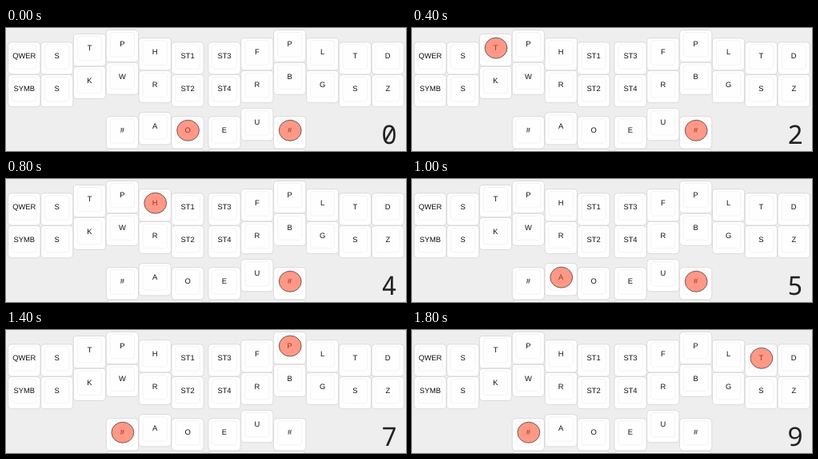
An HTML page that plays this animation: 500 px wide and 154 px high, repeating every 2 s.

```html
<!DOCTYPE html>
<html lang="en">
<head>
<meta charset="utf-8">
<title>Steno key sequence</title>
<style>
  html, body { margin: 0; width: 100%; height: 100%; overflow: hidden; background: #eee; }
  svg { display: block; width: 500px; height: 154px; text-rendering: geometricPrecision; }
  .cap { fill: #fff; stroke: #d4d4d4; stroke-width: .8; }
  .top { fill: #fefefe; stroke: #e2e2e2; stroke-width: .7; stroke-dasharray: 1.5 1; }
  .label { font: 9.4px "Liberation Sans", Arial, sans-serif; fill: #111; text-anchor: middle; }
  .press { fill: rgb(255, 78, 48); fill-opacity: .58; stroke: #5c4a48; stroke-opacity: .85; stroke-width: 1; }
  .count { font: 32.5px "Noto Sans Mono", monospace; fill: #222; text-anchor: middle; }
</style>
</head>
<body>
<svg viewBox="0 0 500 154">
  <rect width="500" height="154" fill="#eee"/>
  <g id="keys"></g>
  <g id="marks"></g>
  <text id="count" class="count" x="479" y="145.2"></text>
</svg>
<script>
const NS = "http://www.w3.org/2000/svg";
const STEP = 200, PITCH = 40.85;
const keys = document.getElementById("keys");
const marks = document.getElementById("marks");
const count = document.getElementById("count");

function add(parent, tag, attrs) {
  const el = document.createElementNS(NS, tag);
  for (const name in attrs) el.setAttribute(name, attrs[name]);
  return parent.appendChild(el);
}

// Label centres, with a vertical stagger for each column
const stagger = [0, 0, -10.2, -15.3, -5.1, 0, 0, -5.1, -15.3, -5.1, 0, 0];
const columnX = c => c < 6 ? 22.8 + c * PITCH : 273 + (c - 6) * PITCH;
const rows = [
  { y: 35, first: 0, labels: "QWER S T P H ST1 ST3 F P L T D".split(" ") },
  { y: 75.7, first: 0, labels: "SYMB S K W R ST2 ST4 R B G S Z".split(" ") },
  { y: 128, first: 3, labels: "# A O E U #".split(" "), shift: [0, -5.1, 0, 0, -10.2, 0] }
];

// Wide keys cut off by the bottom edge
for (const c of [3, 6]) {
  add(keys, "rect", { class: "cap", x: columnX(c) - 20.1, y: 152, width: 2 * PITCH + 40.2, height: 40, rx: 4 });
}

const spots = [];
for (const row of rows) {
  row.labels.forEach((text, i) => {
    const x = columnX(row.first + i);
    const y = row.y + (row.shift || stagger)[i];
    spots.push({ x, y });
    add(keys, "rect", { class: "cap", x: x - 20.1, y: y - 17.2, width: 40.2, height: 40.2, rx: 4 });
    add(keys, "rect", { class: "top", x: x - 15.2, y: y - 14.2, width: 30.4, height: 30.4, rx: 3 });
    add(keys, "text", { class: "label", x, y: y + 3.1 }).textContent = text;
  });
}

// Keys held at each count; the two # thumbs are 24 and 29
const LEFT = 24, RIGHT = 29;
const chords = [
  [26, RIGHT], [1, RIGHT], [2, RIGHT], [3, RIGHT], [4, RIGHT], [25, RIGHT],
  [7, LEFT], [8, LEFT], [9, LEFT], [10, LEFT]
];
const ovals = [0, 1].map(() => add(marks, "ellipse", { class: "press", rx: 13.9, ry: 13 }));

function draw(time) {
  const n = Math.floor(time / STEP) % chords.length;
  chords[n].forEach((key, i) => {
    ovals[i].setAttribute("cx", spots[key].x + 0.5);
    ovals[i].setAttribute("cy", spots[key].y + 0.3);
  });
  count.textContent = n;
}

const start = performance.now();
function tick() {
  draw(performance.now() - start);
  requestAnimationFrame(tick);
}
tick();
</script>
</body>
</html>
```
